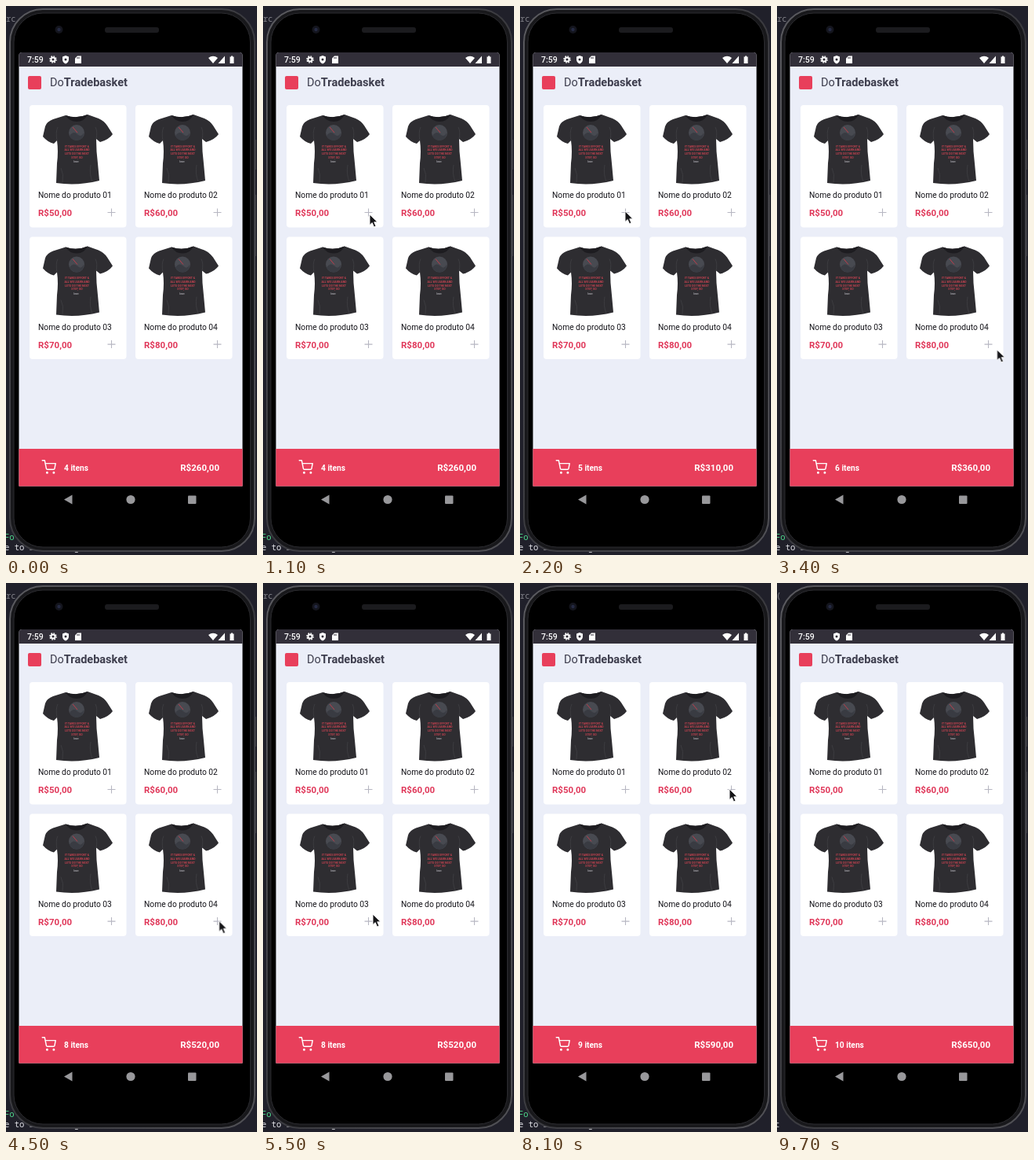
Animation, 320 px wide and 698 px high, one loop 9.8 s. Source, as an HTML page:

```html
<!DOCTYPE html>
<html lang="pt-BR">
<head>
<meta charset="utf-8">
<title>Loja</title>
<style>
  html, body { margin: 0; width: 100%; height: 100%; overflow: hidden; background: #20202a; }
  #stage { display: block; width: 320px; height: 698px; font-family: Roboto, sans-serif; }
  text { white-space: pre; }
  .mono { font: 10.6px "Noto Sans Mono", monospace; fill: #e3e3e8; }
  .name { font-size: 10.25px; fill: #15141a; }
  .price { font-size: 11.5px; font-weight: 700; fill: #e0385a; }
  .rows { font-weight: 700; font-size: 11.5px; fill: #fff; }
  .rows .qty { font-size: 10.2px; }
  .rows, .glitch, .gear, .before, .after { animation: 9.8s step-end infinite; }
  .rows { animation-name: totals; }
  .glitch { animation-name: glitch; }
  .before { animation-name: leave; }
  .gear { animation-name: gear; }
  .after { animation-name: enter; }
  .cursor { animation: roam 9.8s linear infinite; }

  @keyframes totals {
    0% { transform: translateY(0); }
    16.3% { transform: translateY(-50px); }
    26% { transform: translateY(-100px); }
    37.8% { transform: translateY(-150px); }
    42.9% { transform: translateY(-200px); }
    62.2% { transform: translateY(-250px); }
    85.2%, 100% { transform: translateY(-300px); }
  }
  @keyframes glitch {
    0% { opacity: 0; }
    18.9% { opacity: 1; }
    20.9%, 100% { opacity: 0; }
  }
  @keyframes gear { 0% { opacity: 1; } 90.3%, 100% { opacity: 0; } }
  @keyframes leave { 0% { opacity: 1; } 96.5%, 100% { opacity: 0; } }
  @keyframes enter { 0% { opacity: 0; } 96.5%, 100% { opacity: 1; } }
  @keyframes roam {
    0%, 5.1% { transform: translate(60px, 705px); }
    10.2% { transform: translate(135px, 268px); }
    11.2% { transform: translate(136px, 265px); }
    19.4% { transform: translate(134px, 260px); }
    26.5% { transform: translate(134px, 262px); }
    32.6% { transform: translate(272px, 432px); }
    34.7% { transform: translate(280.5px, 437px); }
    37.8% { transform: translate(271px, 429px); }
    43.9% { transform: translate(275px, 429px); }
    46.9% { transform: translate(270px, 430px); }
    52% { transform: translate(150px, 425px); }
    56.1% { transform: translate(140px, 421px); }
    62.2% { transform: translate(135px, 428px); }
    69.4% { transform: translate(137px, 431px); }
    75.5% { transform: translate(137px, 432px); }
    77.5% { transform: translate(190px, 420px); }
    79.6% { transform: translate(264px, 265px); }
    82.6%, 88.8% { transform: translate(267px, 262px); }
    90.8%, 92.9% { transform: translate(224px, 417px); }
    98%, 100% { transform: translate(150px, 705px); }
  }
</style>
</head>
<body>
<svg id="stage" viewBox="0 0 320 698">
  <defs>
    <g id="shirt">
      <path fill="#2e2d31" d="M76 139Q90 144 104 138L118 143Q125 146 129 152L136 163Q131 170 120 173L115 169Q115 185 117 200L119 222Q91 229 64 225L65 200Q67 185 65 171L61 175Q53 173 47 166L50 153Q52 147 60 144Z"/>
      <path fill="#1d1c20" d="M76 139Q90 144 104 138Q100 147 90 147Q81 147 76 139Z"/>
      <path fill="none" stroke="#414045" stroke-width=".8" d="M65 171Q63 160 66 154M115 169Q117 160 114 154M70 206Q74 214 72 224M108 202Q106 214 110 223"/>
      <circle cx="90" cy="161" r="10" fill="#484a51"/>
      <path fill="#393b42" d="M81 165Q86 158 91 163T99 161Q99 170 90 171Q83 170 81 165Z"/>
      <path stroke="#c93d4c" stroke-width=".9" d="M85 154L91 161"/>
      <g font-size="3.5" font-weight="700" fill="#c44250" text-anchor="middle">
        <text x="90.5" y="179.5">IT TAKES EFFORT &amp;</text>
        <text x="90.5" y="184.3">ALL WE LEARN AND</text>
        <text x="90.5" y="189.1">LETS DO THE NEXT</text>
        <text x="90.5" y="193.9">STEP, GO</text>
        <text x="89.5" y="199" font-size="2.7" fill="#a5a4aa">brave</text>
      </g>
    </g>
    <clipPath id="torn">
      <path clip-rule="evenodd" d="M16.5 264H301.5V615H264V610.5H16.5Z
        M16.5 462H58V530H137V520H144V527H170V514H190V520H200V527H213V516H240L250 537H264V546H16.5Z
        M60 506H73V508H60Z M118 514H137V519H118Z M144 510H170V514H144Z
        M16.5 549H59V597H82V590H96V600H127V595H136V599H190V596H264V610.5H16.5Z
        M84 571H118V567H160V571H186V566H209V573H84Z M222 567H250V575H222Z M238 578H252V592H238Z"/>
    </clipPath>
    <clipPath id="screen"><path d="M16.5 610.5V63Q16.5 59 20.5 59H297.5Q301.5 59 301.5 63V610.5Z"/></clipPath>
    <linearGradient id="rim" x2="1" y2="1">
      <stop offset="0" stop-color="#5b5b60"/>
      <stop offset=".5" stop-color="#3a3a3f"/>
      <stop offset="1" stop-color="#515156"/>
    </linearGradient>
  </defs>

  <!-- Terminal behind the phone -->
  <rect width="320" height="698" fill="#20202a"/>
  <g class="before">
    <text class="mono" x="0" y="20" fill-opacity=".5">rc</text>
    <text class="mono" x="-2" y="679" style="fill:#4fd68a">Fo</text>
    <text class="mono" x="-2" y="692">e to be running</text>
  </g>
  <g class="after">
    <text class="mono" x="-1" y="20" fill-opacity=".5">(</text>
    <text class="mono" x="-3" y="692">t</text>
  </g>

  <!-- Phone body -->
  <path stroke="#3b3b40" stroke-width="2" d="M318 170V208M318 240V318"/>
  <rect x="5" y="4" width="312" height="689" rx="42" fill="#18181b" stroke="url(#rim)" stroke-width="2"/>
  <rect x="10" y="9" width="301.5" height="679" rx="37" fill="#000" stroke="#2c2c30"/>
  <rect x="126" y="27" width="69" height="7" rx="3" fill="#1b1b1e"/>
  <circle cx="67.5" cy="30" r="5" fill="#14151d"/>
  <circle cx="67.5" cy="30" r="2.2" fill="#252a42"/>

  <g clip-path="url(#screen)">
    <rect x="16" y="59" width="286" height="552" fill="#ebeef8"/>
    <rect x="16" y="59" width="286" height="18" fill="#322f39"/>
    <rect x="16" y="563" width="286" height="48" fill="#e83f5b"/>
  </g>

  <!-- Status bar -->
  <g fill="#fff">
    <text x="27" y="72" font-size="10.5" font-weight="500">7:59</text>
    <g class="gear" fill="none" stroke="#fff">
      <circle cx="60" cy="68" r="2.6" stroke-width="2"/>
      <circle cx="60" cy="68" r="4.1" stroke-width="1.4" stroke-dasharray="1.7 1.52"/>
    </g>
    <path d="M76 63L80 64.5V68Q80 71.5 76 73.5Q72 71.5 72 68V64.5Z"/>
    <circle cx="76" cy="68" r="1.5" fill="#322f39"/>
    <path d="M91 63.5H96V73H88V66.5Z"/>
    <path stroke="#322f39" d="M91 65V67M93 65V67"/>
    <path d="M258 66Q264 61.5 270 66L264 73Z"/>
    <path d="M279 63.5V73H270.5Z"/>
    <path d="M285.5 64.5H287V63.5H289V64.5H290.5V73H285.5Z"/>
  </g>

  <!-- Header -->
  <rect x="28" y="89" width="17" height="17" rx="2" fill="#e83f5b"/>
  <text x="56" y="102" font-size="14.5" fill="#3d3d4d">Do<tspan font-weight="700">Tradebasket</tspan></text>

  <g id="cards"></g>

  <!-- Cart bar -->
  <g transform="translate(45.5 577) scale(.77)" fill="none" stroke="#fff" stroke-width="1.9" stroke-linecap="round" stroke-linejoin="round">
    <circle cx="9" cy="21" r="1"/><circle cx="20" cy="21" r="1"/>
    <path d="M1 1h4l2.68 13.39a2 2 0 0 0 2 1.61h9.72a2 2 0 0 0 2-1.61L23 6H6"/>
  </g>
  <svg x="17" y="563" width="284" height="47" viewBox="17 563 284 47" overflow="hidden">
    <g class="rows" id="rows"></g>
  </svg>

  <!-- Navigation -->
  <g fill="#98989b">
    <path d="M74 627.5L84.5 621.5V633.5Z"/>
    <circle cx="159" cy="627.5" r="5.6"/>
    <rect x="232" y="622.5" width="10.5" height="10.5" rx="1"/>
  </g>

  <!-- Terminal showing through -->
  <g class="glitch" opacity="0">
    <g clip-path="url(#torn)">
      <rect x="16" y="264" width="286" height="351" fill="#282833"/>
      <path d="M17 474.5H301" stroke="#b9b9c0" stroke-dasharray="1 1"/>
      <g class="mono">
        <text x="57" y="514">te 'rm "/data/local/tmp/app-debug.apk"</text>
        <text x="58" y="528">wait. Ready -</text>
        <text x="17" y="554">exing</text>
        <text x="58" y="582">ures were used in this build, making it</text>
        <text x="57" y="596">7.0</text>
        <text x="301" y="610" text-anchor="end">ation w</text>
      </g>
    </g>
  </g>

  <g class="cursor">
    <path d="M0 0V13.5L3.2 10.6L5.5 16L8 15L5.7 9.8H10Z" fill="#151518" stroke="#fff" stroke-width=".9" stroke-linejoin="round"/>
  </g>
</svg>
<script>
  const card = (price, i) => `
    <g transform="translate(${i % 2 * 135} ${Math.floor(i / 2) * 167.6})">
      <rect x="30" y="126" width="123.5" height="155.5" rx="4" fill="#fff"/>
      <use href="#shirt"/>
      <text class="name" x="41" y="244">Nome do produto 0${i + 1}</text>
      <text class="price" x="41" y="267">R$${price},00</text>
      <path d="M129.5 262.5H139.5M134.5 257.5V267.5" stroke="#b7b7c2" stroke-width="1.1"/>
    </g>`;
  const row = (total, i) => `
    <text class="qty" x="74" y="${591 + i * 50}">${i + 4} itens</text>
    <text x="272" y="${591 + i * 50}" text-anchor="end">R$${total},00</text>`;
  const fill = (id, list, draw) => {
    document.getElementById(id).innerHTML = list.map(draw).join("");
  };
  fill("cards", [50, 60, 70, 80], card);
  fill("rows", [260, 310, 360, 440, 520, 590, 650], row);
</script>
</body>
</html>
```
